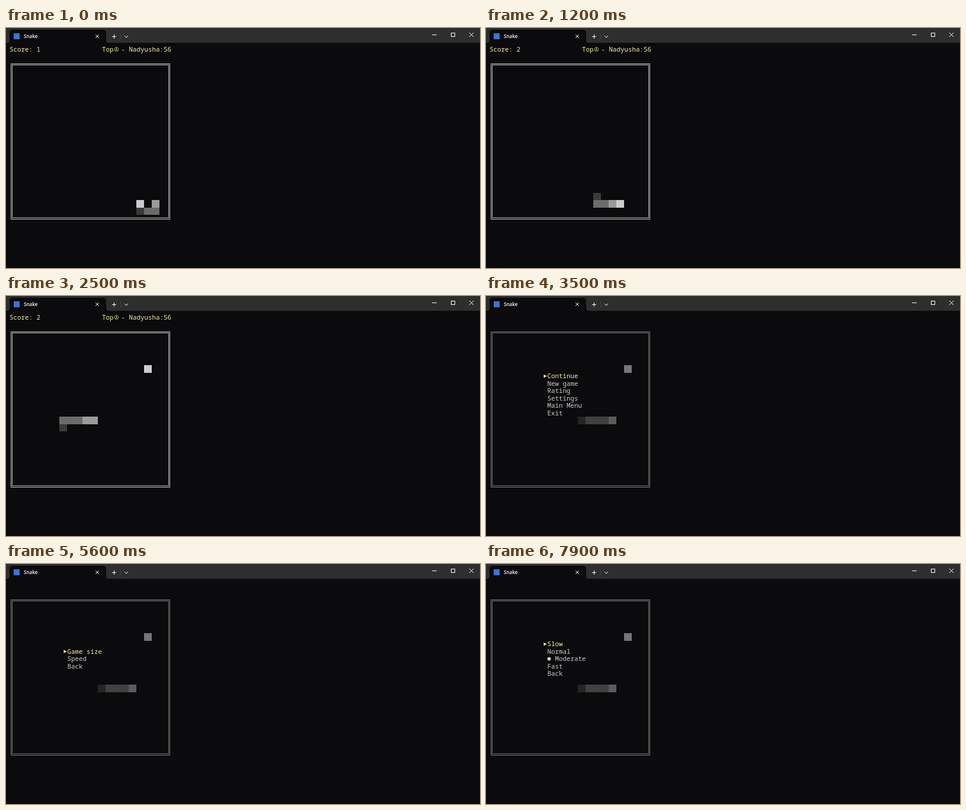
These frames come from a looping animation (800x406 px, 8000 ms). An HTML page with a canvas:

```html
<!DOCTYPE html>
<html lang="en">
<head>
<meta charset="utf-8">
<title>Snake</title>
<style>
html, body { margin: 0; overflow: hidden; background: #0b0a0c; }
canvas { display: block; }
</style>
</head>
<body>
<canvas id="stage" width="800" height="406"></canvas>
<script>
const ctx = document.getElementById('stage').getContext('2d');
const LOOP = 8000, STEP = 59.3, PHASE = 0.86, PAUSE = 2850;
const BG = '#0b0a0c', GREY = '#cccccc', YELLOW = '#f9f1a5';
const MONO = '500 10.83px "Noto Sans Mono", "DejaVu Sans Mono", monospace';

// Block shades, while playing and while the menu is open
const LIVE = { line: '#c4c4c4', full: '#cccccc', head: '#9b9b9b', body: '#6b6b6b', tail: '#3a3a3a' };
const DIM = { line: '#7c7c7c', full: '#767676', head: '#5b5b5b', body: '#404040', tail: '#252525' };

// Corners of the snake's route as [column, row]
const ROUTE = [[16, 22], [18, 22], [18, 14], [13, 14], [13, 21], [16, 21], [16, 16], [6, 16], [6, 14], [15, 14]];
const START = 3, LAST = 48, EAT = 22;
const trail = [ROUTE[0]];
for (const [col, row] of ROUTE.slice(1)) {
  let [x, y] = trail[trail.length - 1];
  while (x !== col || y !== row) {
    x += Math.sign(col - x);
    y += Math.sign(row - y);
    trail.push([x, y]);
  }
}

const MAIN = ['Continue', 'New game', 'Rating', 'Settings', 'Main Menu', 'Exit'];
const SETTINGS = ['Game size', 'Speed', 'Back'];
const SPEED = ['Slow', 'Normal', '● Moderate', 'Fast', 'Back'];
// [start time, items, first row, selected item]
const SCREENS = [
  [PAUSE, MAIN, 8, 0], [3620, MAIN, 8, 1], [3920, MAIN, 8, 2], [4220, MAIN, 8, 3],
  [4650, SETTINGS, 9, 0], [5680, SETTINGS, 9, 1],
  [6100, SPEED, 8, 0], [6650, SPEED, 8, 1], [7350, SPEED, 8, 0]
];

const rowY = row => 30 + row * 12.45;
const colX = col => 6 + col * 6.5;

function text(str, col, row, color) {
  ctx.font = MONO;
  ctx.fillStyle = color;
  ctx.fillText(str, colX(col), Math.round(rowY(row) + 9.8));
}

function cell([col, row], color) {
  const top = Math.round(rowY(row));
  ctx.fillStyle = color;
  ctx.fillRect(12 + col * 13, top, 13, Math.round(rowY(row + 1)) - top);
}

function strokeLines(color, width, ...lines) {
  ctx.strokeStyle = color;
  ctx.lineWidth = width;
  ctx.beginPath();
  for (const [first, ...rest] of lines) {
    ctx.moveTo(...first);
    rest.forEach(p => ctx.lineTo(...p));
  }
  ctx.stroke();
}

function cross(x, y, r) {
  strokeLines('#ffffff', 1, [[x - r, y - r], [x + r, y + r]], [[x - r, y + r], [x + r, y - r]]);
}

function drawWindow() {
  ctx.fillStyle = BG;
  ctx.fillRect(0, 0, 800, 406);
  ctx.fillStyle = '#2e2e2e';
  ctx.fillRect(0, 0, 800, 25);

  ctx.fillStyle = BG;
  ctx.beginPath();
  ctx.moveTo(2, 25);
  ctx.arcTo(6, 25, 6, 21, 4);
  ctx.arcTo(6, 3, 12, 3, 5);
  ctx.arcTo(169, 3, 169, 9, 5);
  ctx.arcTo(169, 25, 173, 25, 4);
  ctx.fill();

  ctx.fillStyle = '#3b73d1';
  ctx.fillRect(13, 9, 10, 10);
  ctx.font = '600 8.1px "Open Sans", "Noto Sans", sans-serif';
  ctx.fillStyle = '#ffffff';
  ctx.fillText('Snake', 30, 17);

  cross(154, 14, 2.8);
  strokeLines('#ffffff', 1, [[179, 14.5], [186, 14.5]], [[182.5, 11], [182.5, 18]]);
  strokeLines('#444444', 1, [[193.5, 9], [193.5, 19]]);
  strokeLines('#ffffff', 1, [[200, 13], [203, 16], [206, 13]]);
  strokeLines('#ffffff', 1, [[719, 11.5], [727, 11.5]]);
  ctx.strokeRect(751.5, 8.5, 6, 6);
  cross(785.5, 11.5, 3.6);
}

function drawField(shades) {
  ctx.strokeStyle = shades.line;
  ctx.lineWidth = 1;
  ctx.strokeRect(8.5, 60.5, 268, 263);
  ctx.strokeRect(10.5, 62.5, 264, 258.5);
}

function drawSnake(t, shades) {
  const progress = t / STEP + PHASE;
  const step = Math.min(Math.floor(progress), LAST);
  // Just after a move the old head and tail are still on screen
  const moving = step < LAST && progress - step < 0.05;
  const size = (step < EAT ? 4 : 5) + (moving ? 1 : 0);
  cell(step < EAT ? [16, 21] : [17, 7], shades.full);
  for (let i = 0; i < size; i++) {
    const part = i === 0 || (moving && i === 1) ? 'head' : i === size - 1 ? 'tail' : 'body';
    cell(trail[START + step - i], shades[part]);
  }
  return step;
}

function drawScore(step) {
  text('Score: ' + (step < EAT - 1 ? 1 : 2), 0, 0, YELLOW);
  text('Top', 24, 0, YELLOW);
  text('- Nadyusha:56', 29, 0, YELLOW);
  ctx.font = '11px "DejaVu Sans", sans-serif';
  ctx.fillText('♔', 181.5, 40);
}

function drawMenu([, items, top, selected]) {
  items.forEach((item, i) => {
    const row = top + i, mid = rowY(row) + 6;
    const color = i === selected ? YELLOW : GREY;
    if (item[0] === '●') {
      ctx.fillStyle = color;
      ctx.beginPath();
      ctx.arc(106.5, mid, 3, 0, 7);
      ctx.fill();
      text(item.slice(2), 17, row, color);
    } else {
      text(item, 15, row, color);
    }
    if (i === selected) {
      ctx.fillStyle = color;
      ctx.beginPath();
      ctx.moveTo(97.5, mid - 2.8);
      ctx.lineTo(102.6, mid);
      ctx.lineTo(97.5, mid + 2.8);
      ctx.fill();
    }
  });
}

function draw() {
  const t = performance.now() % LOOP;
  const paused = t >= PAUSE;
  const shades = paused ? DIM : LIVE;
  drawWindow();
  drawField(shades);
  const step = drawSnake(t, shades);
  if (paused) drawMenu(SCREENS.filter(s => s[0] <= t).pop());
  else drawScore(step);
  requestAnimationFrame(draw);
}
draw();
</script>
</body>
</html>
```
